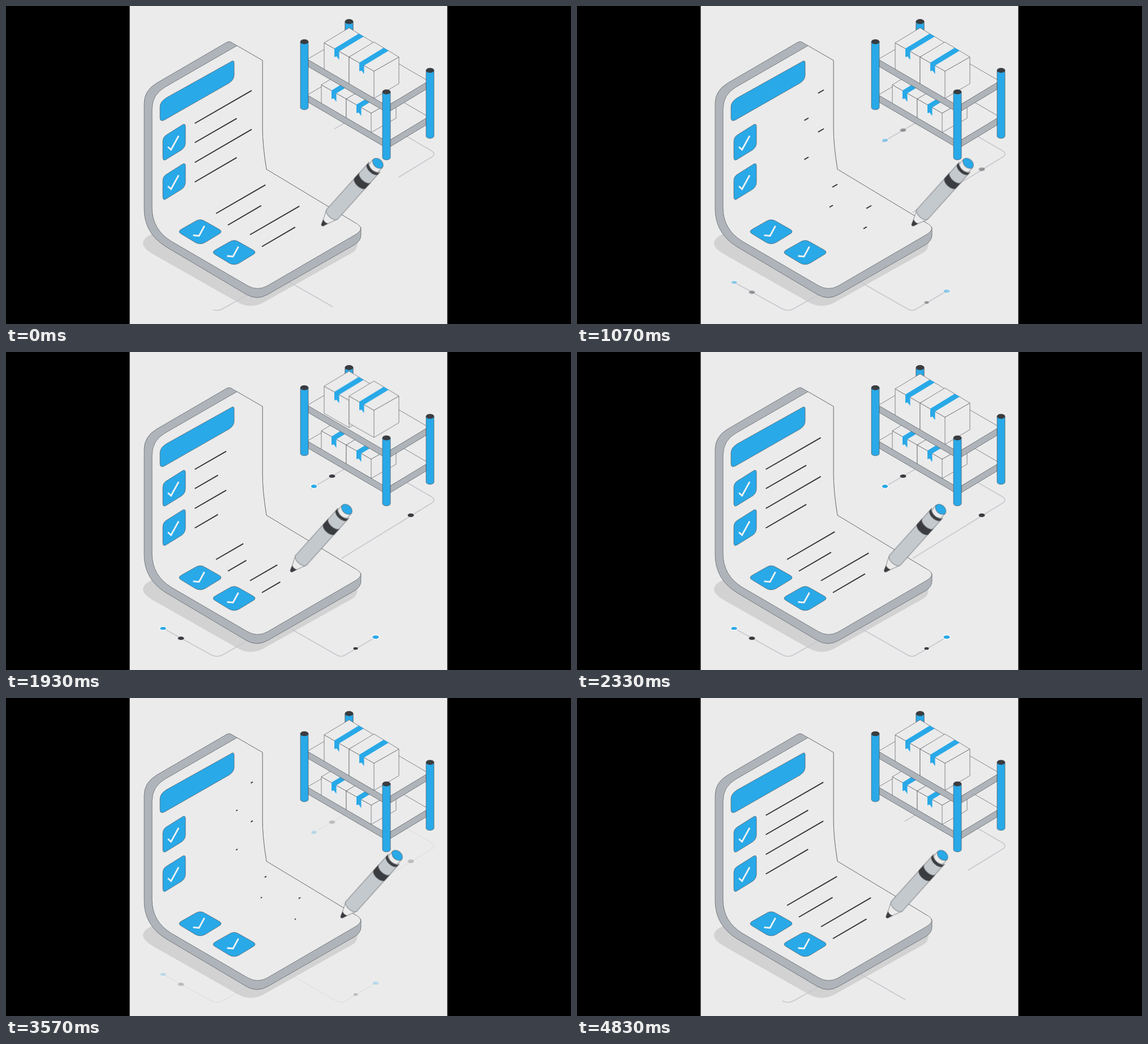
An HTML page that plays this animation: 998 by 561 pixels, repeating every 4.86 s.

```html
<!DOCTYPE html>
<html lang="en">
<head>
<meta charset="utf-8">
<title>Checklist and shelf</title>
<style>
  html, body { margin: 0; width: 100%; height: 100%; overflow: hidden; background: #000; }
  svg { display: block; }

  .paper { fill: #ebebeb; }
  .blue { fill: #29a9e8; }
  .dark { fill: #3a3c40; }
  .steel { fill: #aeb4b9; }
  .silver { fill: #c4c9cd; }
  .outlined { stroke: #54585d; stroke-width: .7; stroke-linejoin: round; }
  .tick { fill: none; stroke: #f3f3f3; stroke-width: 2.8; }
  .rows { stroke: #34363a; stroke-width: 2; }
  .floor { fill: none; stroke: #c8c8d0; stroke-width: 1.7; }
  .rows path, .floor path { stroke-dasharray: 1 1; }

  /* Every animation is held at the frame set by the script; --start is its first frame. */
  .rows path, .floor path, .dots, .pen, .hop {
    --start: 0;
    animation: 2400ms linear infinite paused;
    animation-delay: calc((var(--start) - var(--frame, 0) - 144) * 33.3333ms);
  }

  .rows path { --start: 3; animation-name: rewrite; animation-timing-function: cubic-bezier(.333, 0, .667, 1); }
  @keyframes rewrite {
    0% { stroke-dashoffset: 0; }
    50% { stroke-dashoffset: -1; }
    100% { stroke-dashoffset: -2; }
  }

  .floor path { --start: 98; animation-name: trace; animation-duration: 4800ms; }
  @keyframes trace {
    0% { stroke-dashoffset: 0; opacity: 1; }
    8.3% { stroke-dashoffset: 0; opacity: 0; }
    8.31% { stroke-dashoffset: 1; opacity: 0; }
    9.72% { stroke-dashoffset: 1; opacity: 1; }
    51.4%, 100% { stroke-dashoffset: 0; opacity: 1; }
  }

  .dots { --start: 98; animation-name: dots; animation-duration: 4800ms; }
  @keyframes dots {
    0% { opacity: 1; }
    8.3%, 51.4% { opacity: 0; }
    57.6%, 100% { opacity: 1; }
  }

  .hop { --start: 39; animation-name: hop; animation-timing-function: cubic-bezier(.333, 0, .667, 1); }
  .hop.late { --start: 45; }
  @keyframes hop {
    0%, 33.33%, 100% { transform: translateY(0); }
    16.67% { transform: translateY(-12.5px); }
  }

  .pen { --start: 4.1; animation-name: scribble; animation-timing-function: cubic-bezier(.37, 0, .63, 1); }
  @keyframes scribble {
    0%, 50%, 62.5%, 75%, 87.5%, 100% { transform: translateX(-56px); }
    13.75%, 17.9% { transform: translateX(247px); }
    33.2%, 43.75% { transform: translateX(33px); }
    56.25%, 68.75%, 81.25%, 93.75% { transform: translateX(0); }
  }
</style>
</head>
<body>
<svg width="998" height="561" viewBox="0 0 998 561">
  <defs>
    <clipPath id="stage"><path d="M218.500 0H779.500V561H218.500Z"/></clipPath>
    <g id="lid">
      <path class="paper outlined" d="M0 0L44-26.500L88 0L44 25Z"/>
      <path class="blue" d="M18 10L61-16.300L70-11.300L26.500 15V30L22 24L18 25Z"/>
    </g>
    <g id="box">
      <path class="paper outlined" d="M0 0V48L44 73L88 47V0L44 25ZM44 25V73"/>
      <use href="#lid"/>
    </g>
    <g id="low-box">
      <path class="paper outlined" d="M0 0V34L44 59L88 34V0L44 25ZM44 25V59"/>
      <use href="#lid"/>
    </g>
    <g id="pole">
      <path class="blue outlined" d="M-7 0V116A7 4 0 0 0 7 116V0Z"/>
      <ellipse class="dark" rx="7.300" ry="4.300"/>
    </g>
    <path id="deck" class="paper outlined" d="M527 97L606 51L749 134L672 177Z"/>
    <path id="rails" class="steel outlined" d="M534 95L666 172V184L534 107ZM679 173L742 135V147L679 185Z"/>
    <g id="wall-check">
      <path class="blue outlined" d="M277 239Q277 231 284 227L311 210Q317 206 317 213V241Q317 249 310 254L284 270Q277 275 277 267Z"/>
      <path class="tick" d="M286 248.500L291.500 253.500L305 229"/>
    </g>
    <g id="floor-check">
      <path class="blue outlined" d="M334 380Q343 374 352 380L375 393Q385 398 375 403L352 417Q343 422 334 417L311 403Q301 398 311 393Z"/>
      <path class="tick" d="M330.500 404.500L341 405.500L350.500 388"/>
    </g>
  </defs>

  <g clip-path="url(#stage)">
    <path class="paper" d="M218 0H780V561H218Z"/>

    <path fill="#d2d2d3" d="M258 402Q241 410 242 420Q244 429 260 438L410 523Q432 535 455 523L612 435Q621 430 621 417Z"/>

    <g class="floor">
      <path pathLength="1" d="M706 229L751 255Q761 261 751 267L593 364"/>
      <path pathLength="1" d="M492 482L583 534Q592 540 600 534L653 503"/>
      <path pathLength="1" d="M628 189L538 241"/>
      <path pathLength="1" d="M468 486L383 534Q373 540 362 534L277 487"/>
    </g>
    <g class="dots">
      <g class="blue" stroke="#f5f5f5" stroke-width="1.800">
        <ellipse cx="544" cy="237" rx="6" ry="3.800"/>
        <ellipse cx="277.500" cy="487.500" rx="6" ry="3.500"/>
        <ellipse cx="653" cy="503" rx="6.500" ry="4"/>
      </g>
      <g class="dark">
        <ellipse cx="576" cy="219" rx="5.500" ry="3"/>
        <ellipse cx="309" cy="505" rx="5.500" ry="3"/>
        <ellipse cx="617.500" cy="523" rx="4" ry="2.300"/>
        <ellipse cx="715" cy="288" rx="5.500" ry="3.200"/>
      </g>
    </g>

    <g id="shelf">
      <use href="#pole" x="606" y="27.500"/>
      <use href="#deck" y="63"/>
      <use href="#low-box" x="557" y="139"/>
      <use href="#low-box" x="601" y="164"/>
      <use href="#rails" y="63"/>
      <use href="#deck"/>
      <path class="blue outlined" d="M599 28V70H613V28Z"/>
      <ellipse class="dark" cx="606" cy="27.500" rx="7.300" ry="4.300"/>
      <g class="hop"><use href="#box" x="562" y="65"/></g>
      <g class="hop late"><use href="#box" x="606" y="90"/></g>
      <use href="#rails"/>
      <use href="#pole" x="527" y="63"/>
      <use href="#pole" x="749" y="113.500"/>
      <use href="#pole" x="672" y="151.500"/>
    </g>

    <g id="tablet">
      <path class="steel outlined" d="M408 70L397 63.500Q394 62 390 64L266 136Q244 149 244 172V358Q244 401 283 425L424 508.500Q443 520 462 509L616 421Q627 414 627 404V391L616 382L460 288Q453 245 453 215V96Z"/>
      <path class="paper outlined" d="M408 70L281 143Q258 156 258 182V356Q258 394 292 415L427 493.500Q444 503 461 494L616 404Q637 392 616 382L460 288Q453 245 453 215V96Z"/>
      <path class="blue outlined" d="M272 178Q272 169 283 162L397 98.500Q403 94 403 101V122Q403 130 394 136L280 201Q272 205 272 197Z"/>
      <use href="#wall-check"/>
      <use href="#wall-check" y="69.500"/>
      <use href="#floor-check"/>
      <use href="#floor-check" x="60" y="36.500"/>
      <g class="rows">
        <path pathLength="1" d="M333.500 207L436 148"/>
        <path pathLength="1" d="M333.500 241L409 197.500"/>
        <path pathLength="1" d="M333.500 276L436 216.500"/>
        <path pathLength="1" d="M333.500 310.500L409 266.500"/>
        <path pathLength="1" d="M371 366L460 314.500"/>
        <path pathLength="1" d="M392 386.500L452 351.500"/>
        <path pathLength="1" d="M431 403.500L520 352"/>
        <path pathLength="1" d="M452 424.500L512 389.500"/>
      </g>
    </g>

    <g class="pen">
      <g id="barrel" transform="translate(559 387.500) rotate(-48)">
        <path class="paper outlined" d="M2-2L27-13V13L2 2Z"/>
        <path class="dark" d="M10-5.500L1-2.500Q-2 0 1 2.500L10 5.500Q7 0 10-5.500Z"/>
      </g>
    </g>
  </g>
</svg>
<script>
  const LOOP = 4860, FRAME = 100 / 3;

  // Pen sections from tip to cap: class, start, end, radius.
  const sections = [
    ["silver", 27, 101, 13],
    ["dark", 101, 114, 13.3],
    ["silver", 114, 134, 13],
    ["dark", 134, 139, 13],
    ["paper", 139, 148, 10.8]
  ];
  const barrel = document.getElementById("barrel");
  const addShape = (tag, attributes) => {
    const shape = document.createElementNS("http://www.w3.org/2000/svg", tag);
    for (const name in attributes) shape.setAttribute(name, attributes[name]);
    barrel.append(shape);
  };
  for (const [tone, from, to, r] of sections) {
    addShape("path", {
      class: tone + " outlined",
      d: `M${from} ${-r}A6.5 ${r} 0 0 0 ${from} ${r}L${to} ${r}A6.5 ${r} 0 0 1 ${to} ${-r}Z`
    });
  }
  addShape("ellipse", { class: "blue outlined", cx: 148, rx: 7.5, ry: 10.8 });

  const begin = performance.now();
  function tick() {
    const time = (performance.now() - begin) % LOOP;
    const frame = Math.min(145, Math.floor((time + 5) / FRAME));
    document.documentElement.style.setProperty("--frame", frame);
    requestAnimationFrame(tick);
  }
  tick();
</script>
</body>
</html>
```
